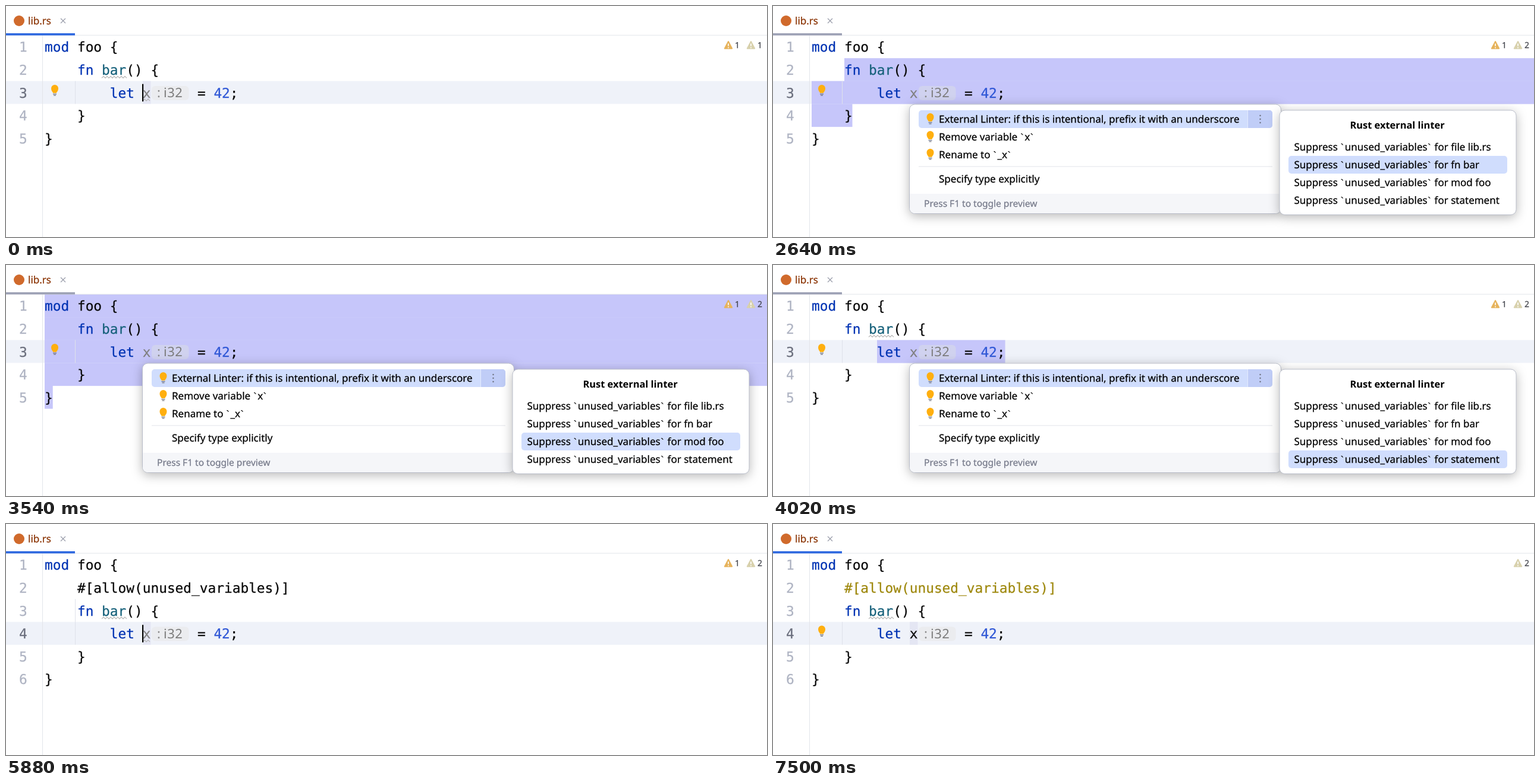
Recreate the animation shown at these times as an HTML page. Size 1280 by 390 pixels, loop 7560 ms.

```html
<!DOCTYPE html>
<html lang="en">
<head>
<meta charset="utf-8">
<title>Suppressing a linter warning</title>
<style>
  html, body { margin: 0; width: 100%; height: 100%; overflow: hidden; background: #fff; }
  svg { display: block; width: 1280px; height: 390px; }
  text { white-space: pre; text-rendering: geometricPrecision; stroke-width: .25px; }
  .code { font: 22.8px "DejaVu Sans Mono", monospace; }
  .ui { font: 17px "Noto Sans", sans-serif; }
  .tick { font: 15px "DejaVu Sans", sans-serif; }
  .small { font: 15.5px "Noto Sans", sans-serif; }
  .count { font: 14px "Noto Sans", sans-serif; }
  .title { font: bold 16.4px "Noto Sans", sans-serif; stroke: none; }
  .hint { font: 22px "Noto Sans", sans-serif; letter-spacing: .5px; stroke: none; }
  .card { filter: drop-shadow(0 4px 9px rgba(0, 0, 0, .28)); }
</style>
</head>
<body>
<svg id="stage" viewBox="0 0 1280 390"></svg>
<script>
const LOOP = 7560;
const CH = 13.727, LEFT = 65, TOP = 49.5, ROW = 38.6;
const BLUE = '#0033b3', NUM = '#2f57d6', FN = '#15607a', INK = '#080808', SEL = '#c6c6fa';

// Moments at which the editor changes, in ms
const T = {
  recount: 120, popup: 600, preview: 840, menu: 1800,
  fn: 2640, mod: 3360, stmt: 4020, file: 4440, fnAgain: 4980,
  apply: 5880, colored: 6120, bulb: 6240, linted: 6480
};

const stage = document.getElementById('stage');
const timed = [];

function add(parent, tag, attrs, text) {
  const el = document.createElementNS('http://www.w3.org/2000/svg', tag);
  for (const k in attrs) el.setAttribute(k, attrs[k]);
  if (text !== undefined) el.textContent = text;
  parent.appendChild(el);
  return el;
}
// Show an element only within the given [from, to) spans
function during(el, ...spans) {
  timed.push({ el, spans });
  return el;
}
const group = (parent, ...spans) => {
  const g = add(parent, 'g', {});
  return spans.length ? during(g, ...spans) : g;
};
const rect = (p, x, y, width, height, fill, more) =>
  add(p, 'rect', { x, y, width, height, fill, ...more });
const path = (p, d, stroke, w, more) =>
  add(p, 'path', { d, stroke, 'stroke-width': w, fill: 'none', ...more });
const label = (p, cls, x, y, text, fill) =>
  add(p, 'text', { class: cls, x, y, fill, stroke: fill }, text);
const rowTop = n => TOP + (n - 1) * ROW;
const colX = c => LEFT + c * CH;
const code = (p, x, row, text, fill = INK) => label(p, 'code', x, rowTop(row) + 27.8, text, fill);

// Menu text, with backticks set in a wider face
function menuText(p, x, y, text) {
  const el = label(p, 'ui', x, y, '', '#000');
  for (const part of text.split(/(`)/))
    add(el, 'tspan', { class: part === '`' ? 'tick' : 'ui' }, part);
}
function squiggle(p, x, row, width) {
  const y = rowTop(row) + 33.5;
  let d = `M${x} ${y}`;
  for (let i = 3; i <= width; i += 3) d += `L${x + i} ${y + (i % 2 ? -3 : 0)}`;
  path(p, d, '#b4b4b4', 1.2);
}
function bulb(p, x, y) {
  add(p, 'path', {
    d: `M${x - 3} ${y + 5}C${x - 3} ${y + 3} ${x - 6} ${y + 2} ${x - 6} ${y - 3}` +
       `a6 6 0 0 1 12 0C${x + 6} ${y + 2} ${x + 3} ${y + 3} ${x + 3} ${y + 5}Z`,
    fill: '#ffaf0f'
  });
  path(p, `M${x - 3} ${y + 6.6}h6M${x - 2} ${y + 8.8}h4`, '#6c707e', 1.2);
}
function warning(p, x, fill) {
  add(p, 'path', {
    d: `M${x} 60l6.2 11.7h-12.4Z`, fill, stroke: fill,
    'stroke-width': 2, 'stroke-linejoin': 'round'
  });
  path(p, `M${x} 63.5v4.2M${x} 69.4v1.8`, '#fff', 1.7);
}
function card(p, x, y, width, height) {
  rect(p, x, y, width, height, '#fff',
    { rx: 9, stroke: '#b9bdc9', 'stroke-width': 1, class: 'card' });
}
function pill(p, row, fill) {
  rect(p, 245, rowTop(row) + 8.3, 62.5, 24, fill, { rx: 6 });
}

// Text pieces
function modLine(p) {
  code(p, colX(0), 1, 'mod', BLUE);
  code(p, colX(4), 1, 'foo {');
}
function fnLine(p, row) {
  code(p, colX(4), row, 'fn', BLUE);
  code(p, colX(7), row, 'bar', FN);
  code(p, colX(10), row, '() {');
}
function letLine(p, row) {
  code(p, colX(8), row, 'let', BLUE);
  label(p, 'hint', 254, rowTop(row) + 27.5, ':', '#8b8b8b');
  label(p, 'hint', 265, rowTop(row) + 27.5, 'i32', '#7c7c7c');
  code(p, 322, row, '=');
  code(p, 349.4, row, '42', NUM);
  code(p, 349.4 + 2 * CH, row, ';');
}
function numbers(p, count, current) {
  for (let n = 1; n <= count; n++)
    code(p, 22, n, n, n === current ? '#6a6e7c' : '#aeb3c2');
}
function currentRow(p, row) {
  rect(p, 0, rowTop(row), 1280, ROW, '#eff2f9');
  rect(p, 230, rowTop(row), 13.5, ROW, '#e4e6f3');
}
const guide = (p, from, to) =>
  path(p, `M116.5 ${rowTop(from)}V${rowTop(to + 1)}`, '#dfe2ea', 1);
const caret = (p, row, ...spans) =>
  during(rect(p, 229, rowTop(row) + 5, 2.2, 29.5, '#000'), ...spans);

function drawTab() {
  add(stage, 'circle', { cx: 22, cy: 25, r: 9, fill: '#d06a2c' });
  label(stage, 'ui', 37, 31, 'lib.rs', '#8a3303');
  path(stage, 'M92 21l8 8M100 21l-8 8', '#9a9dab', 1.2);
  path(stage, 'M0 49.3H1280', '#e3e5ea', 1);
  during(rect(stage, 0, 46, 116, 3.6, '#2e68e0'), [0, T.popup], [T.apply, LOOP]);
  during(rect(stage, 0, 46, 116, 3.6, '#9da1b5'), [T.popup, T.apply]);
}

function drawSelections(p) {
  const line = (g, row, from, to) => rect(g, from, rowTop(row), to - from, ROW + .2, SEL);
  const fn = group(p, [T.fn, T.mod], [T.fnAgain, T.apply]);
  line(fn, 2, 120, 1280);
  line(fn, 3, 65, 1280);
  line(fn, 4, 65, 133.5);
  const mod = group(p, [T.mod, T.stmt]);
  for (let r = 1; r < 5; r++) line(mod, r, 65, 1280);
  line(mod, 5, 65, 78.7);
  line(group(p, [T.stmt, T.file]), 3, 175, 390.5);
  const selected = [[T.fn, T.file], [T.fnAgain, T.apply]];
  pill(group(p, ...selected), 3, '#d0d2ef');
}

function drawBefore() {
  const g = group(stage, [0, T.apply]);
  currentRow(g, 3);
  pill(g, 3, '#ebecef');
  squiggle(g, 161, 2, 42);
  squiggle(g, 230, 3, 13);
  drawSelections(g);
  guide(g, 3, 3);
  numbers(g, 5, 3);
  modLine(g);
  fnLine(g, 2);
  letLine(g, 3);
  code(g, colX(12), 3, 'x', '#808080');
  code(g, colX(4), 4, '}');
  code(g, colX(0), 5, '}');
  bulb(g, 82, 142);
  caret(g, 3, [0, T.recount]);
}

function drawAfter() {
  const g = group(stage, [T.apply, LOOP]);
  currentRow(g, 4);
  pill(g, 4, '#ebecef');
  guide(g, 4, 4);
  guide(group(g, [T.apply, T.colored]), 3, 3);
  squiggle(g, 161, 3, 42);
  numbers(g, 6, 4);
  modLine(g);
  const attr = '#[allow(unused_variables)]';
  during(code(g, colX(4), 2, attr), [T.apply, T.colored]);
  during(code(g, colX(4), 2, attr, '#9e880d'), [T.colored, LOOP]);
  fnLine(g, 3);
  letLine(g, 4);
  const unused = group(g, [T.apply, T.linted]);
  squiggle(unused, 230, 4, 13);
  code(unused, colX(12), 4, 'x', '#808080');
  during(code(g, colX(12), 4, 'x'), [T.linted, LOOP]);
  code(g, colX(4), 5, '}');
  code(g, colX(0), 6, '}');
  bulb(group(g, [T.bulb, LOOP]), 82, 180.6);
  caret(g, 4, [T.apply, 6380], [6880, 7380]);
}

function drawCounters() {
  const strong = group(stage, [0, T.linted]);
  warning(strong, 1215, '#e6b35c');
  label(strong, 'count', 1226, 71, '1', '#43454d');
  warning(stage, 1253, '#d8d1ad');
  during(label(stage, 'count', 1264, 71, '1', '#43454d'), [0, T.recount]);
  during(label(stage, 'count', 1264, 71, '2', '#43454d'), [T.recount, LOOP]);
}

function drawPopup() {
  const g = group(stage, [T.popup, T.apply]);
  card(g, 229.5, 166, 625, 184.5);
  add(g, 'path', { d: 'M230 317H854V341.5a8.5 8.5 0 0 1-8.5 8.5H238.5a8.5 8.5 0 0 1-8.5-8.5Z', fill: '#f5f6f9' });
  rect(g, 245, 176, 595, 30, '#d0ddfd', { rx: 5 });
  const button = group(g, [T.menu, T.apply]);
  add(button, 'path', { d: 'M799 176h36a5 5 0 0 1 5 5v20a5 5 0 0 1-5 5h-36Z', fill: '#c0cdf7' });
  path(button, 'M798.5 176v30', '#e4ebfd', 1);
  for (const y of [185, 191, 197]) add(g, 'circle', { cx: 819.5, cy: y, r: 1.2, fill: '#6c707e' });
  path(g, 'M245 271H840', '#e2e4e9', 1);
  ['External Linter: if this is intentional, prefix it with an underscore',
   'Remove variable `x`', 'Rename to `_x`'].forEach((text, i) => {
    bulb(g, 264.5, 190 + 30 * i);
    menuText(g, 279, 197 + 30 * i, text);
  });
  menuText(g, 279, 298, 'Specify type explicitly');
  label(g, 'small', 254, 339.3, 'Press F1 to toggle preview', '#767a8a');
}

function drawPreview() {
  const g = group(stage, [T.preview, T.menu]);
  card(g, 860.5, 166, 375, 46);
  rect(g, 945, 168, 14, 39, '#bee6be');
  const put = (x, text, fill) => label(g, 'code', x, 196, text, fill);
  put(862, '3', '#aeb3c2');
  put(890, 'let', BLUE);
  put(890 + 4 * CH, '_x = ', INK);
  put(890 + 9 * CH, '42', NUM);
  put(890 + 11 * CH, ';', INK);
}

function drawMenu() {
  const g = group(stage, [T.menu, T.apply]);
  card(g, 852, 176, 398, 176.5);
  const items = [
    ['file lib.rs', [T.menu, T.fn], [T.file, T.fnAgain]],
    ['fn bar', [T.fn, T.mod], [T.fnAgain, T.apply]],
    ['mod foo', [T.mod, T.stmt]],
    ['statement', [T.stmt, T.file]]
  ];
  label(g, 'title', 970.5, 207, 'Rust external linter', '#000');
  items.forEach(([what, ...spans], i) => {
    during(rect(g, 867, 223 + 30 * i, 368, 30, '#d0ddfd', { rx: 5 }), ...spans);
    menuText(g, 876.5, 244 + 30 * i, 'Suppress `unused_variables` for ' + what);
  });
}

drawBefore();
drawAfter();
path(stage, 'M61.5 50V390', '#e3e5ea', 1);
drawTab();
drawCounters();
drawPopup();
drawPreview();
drawMenu();

function render() {
  const t = performance.now() % LOOP;
  for (const { el, spans } of timed)
    el.style.display = spans.some(([a, b]) => t >= a && t < b) ? '' : 'none';
  requestAnimationFrame(render);
}
render();
</script>
</body>
</html>
```
